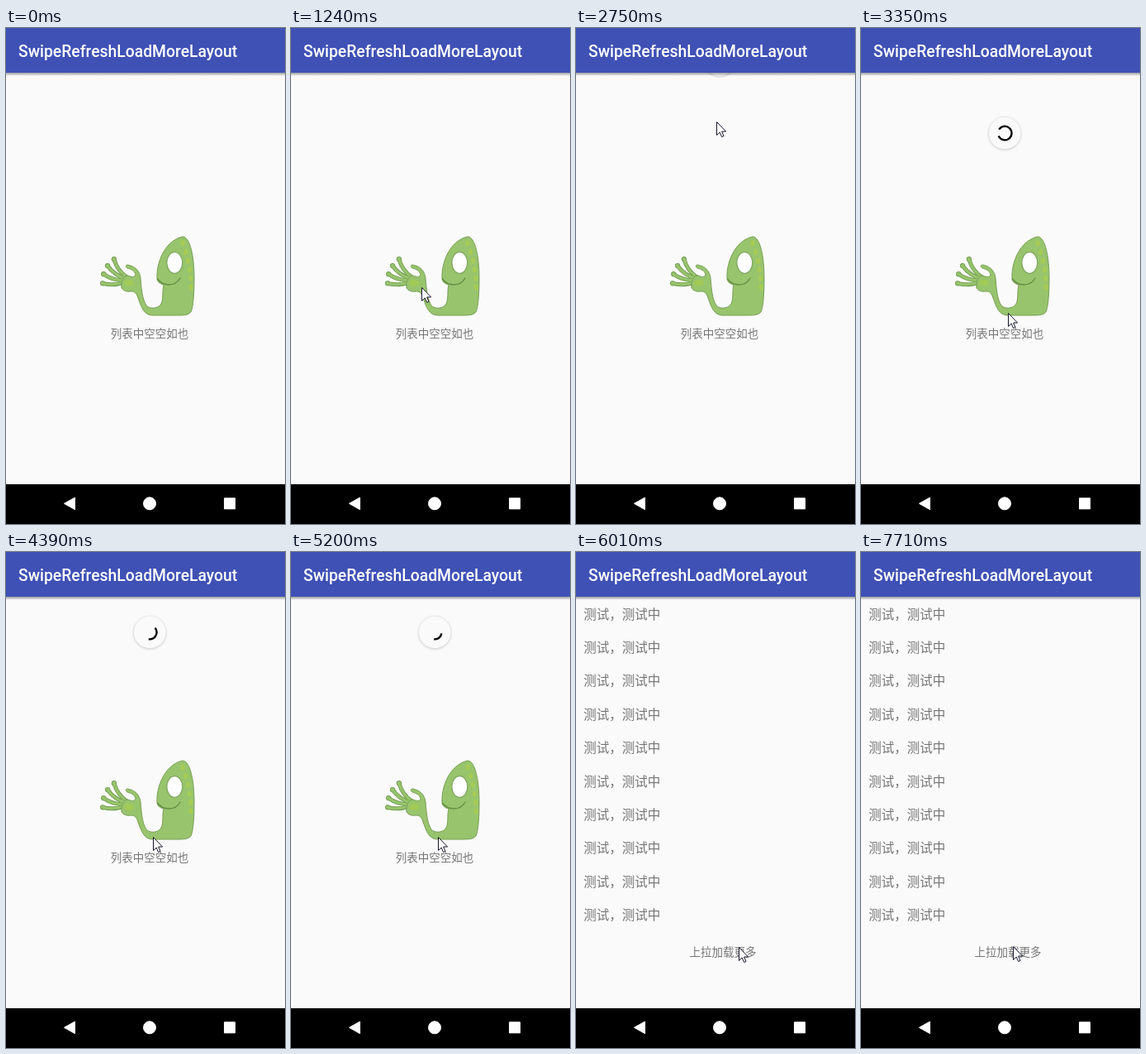
These frames come from a looping animation (338x599 px, 7990 ms). An HTML page:

```html
<!DOCTYPE html>
<html lang="zh-CN">
<head>
<meta charset="utf-8">
<style>
  html, body { margin: 0; width: 100%; height: 100%; overflow: hidden; background: #fafafa; }
  svg { display: block; width: 100vw; height: 100vh; }
  text { font-family: "Noto Sans CJK SC", "Noto Sans CJK", sans-serif; fill: #757575; }
  .title { font: 500 19.34px Roboto, sans-serif; fill: #fff; }
  .row { font-size: 15.5px; }
  .note { font-size: 13.5px; }
</style>
</head>
<body>
<svg viewBox="0 0 338 599" preserveAspectRatio="none">
  <defs>
    <linearGradient id="barShade" x2="0" y2="1">
      <stop stop-color="#000" stop-opacity=".38"/>
      <stop offset="1" stop-color="#000" stop-opacity="0"/>
    </linearGradient>
    <filter id="soft" x="-30%" y="-30%" width="160%" height="160%">
      <feGaussianBlur stdDeviation="1.5"/>
    </filter>
  </defs>
  <rect width="338" height="599" fill="#fafafa"/>

  <g id="empty">
    <g id="fingers" fill="none" stroke-linecap="round"></g>
    <path fill="#98c46d" stroke="#769f55" stroke-linejoin="round" d="
      M214 252 C223 252 228 276 228 302 C228 320 227 336 224 343
      C221 347 214 347 206 347 L178 347 C167 347 164 337 160 326
      C158 320 156 318 151 318 C146 319 142 317 140 314
      C139 306 142 299 148 299 C152 301 156 301 157 298
      C156 293 151 291 147 290 C144 288 145 285 149 286.5
      C157 288 162 294 163 302 C164 314 165 328 170 335
      C174 340 185 339 188 333 C191 327 189 318 191 310
      C186 309 183 306 183 302 C182 284 192 257 214 252 Z"/>
    <ellipse cx="149" cy="308" rx="6" ry="4" fill="#a5cc50" opacity=".75"/>
    <g id="spots" fill="#abcf4f" opacity=".8"></g>
    <path d="M183.5 303 C190 312 205 313 211 302" fill="none" stroke="#648d45" stroke-width="1.3" stroke-linecap="round"/>
    <ellipse cx="204.3" cy="283.5" rx="9.5" ry="12.8" fill="#fff" stroke="#7fa65f" stroke-width="1.3"/>
    <text class="note" x="126.8" y="374.1">列表中空空如也</text>
  </g>

  <g id="list"></g>
  <text id="more" class="note" x="137.5" y="487.6">上拉加载更多</text>

  <g id="spinner">
    <circle cy=".7" r="19.6" fill="#000" opacity=".2" filter="url(#soft)"/>
    <circle r="19.3" fill="#fafafa"/>
    <path id="arc" fill="none" stroke="#000" stroke-width="2.3" stroke-linecap="square"/>
  </g>

  <rect y="54" width="338" height="4" fill="url(#barShade)"/>
  <rect width="338" height="54" fill="#3f51b5"/>
  <text class="title" x="15" y="34.5">SwipeRefreshLoadMoreLayout</text>

  <rect y="551" width="338" height="48" fill="#000"/>
  <g fill="#fff" stroke="#fff" stroke-linejoin="round">
    <path d="M70.5 574.3 L83.5 567 V581.6 Z"/>
    <circle cx="174" cy="574.3" r="7.5"/>
    <rect x="264.5" y="567.8" width="13" height="13"/>
  </g>

  <path id="cursor" d="M.5 .5 V16.5 L4.2 13 L6.6 18.5 L9 17.5 L6.6 12 H11.6 Z"
    fill="#fff" stroke="#17172e"/>
</svg>
<script>
const LOOP = 7990, STEP = 130, PHASE = 100;
const APPEAR_AT = 620, PULL_AT = 2610, RELEASE_AT = 3400;
const FINISH_AT = 3512, SPIN_AT = 4178, CYCLE = 1332;
const LIST_AT = 5300, MORE_AT = 5440;
const REST_Y = 97, HIDDEN_Y = 34, PULLED_Y = 127;

// Pointer strokes: a bend from one point to the next
const STROKES = [
  { start: 620, end: 750, from: [251, 460], bend: [204, 394], to: [157, 328] },
  { start: 1100, end: 2200, from: [157, 328], bend: [168, 124], to: [172, 112] },
  { start: 2210, end: 2470, from: [172, 112], bend: [170, 106], to: [169, 101] },
  { start: PULL_AT, end: 3350, from: [169, 101], bend: [172, 140], to: [178, 344] },
  { start: 5600, end: 5960, from: [178, 344], bend: [174, 320], to: [198, 486] },
  { start: 6900, end: 7640, from: [198, 486], bend: [151, 361], to: [184, 476] },
];

const $ = id => document.getElementById(id);
const clamp = v => Math.min(1, Math.max(0, v));
const progress = (t, start, end) => clamp((t - start) / (end - start));
const show = (el, on) => el.setAttribute("visibility", on ? "visible" : "hidden");
const polar = (r, deg) => [r * Math.cos(deg * Math.PI / 180), r * Math.sin(deg * Math.PI / 180)];

// Cubic easing (0.4, 0, 0.2, 1)
function ease(x) {
  let lo = 0, hi = 1;
  for (let i = 0; i < 20; i++) {
    const u = (lo + hi) / 2, v = 1 - u;
    if (1.2 * u * v * v + 0.6 * u * u * v + u ** 3 < x) lo = u; else hi = u;
  }
  return lo * lo * (3 - 2 * lo);
}

function pointerAt(t) {
  const { start, end, from, bend, to } = STROKES.filter(s => s.start <= t).pop() || STROKES[0];
  const u = progress(t, start, end), v = 1 - u;
  return from.map((a, i) => v * v * a + 2 * u * v * bend[i] + u * u * to[i]);
}

// The spinner follows the drag, then eases back to rest
function spinnerY(t, pointerY) {
  if (t < RELEASE_AT) return HIDDEN_Y + (PULLED_Y - HIDDEN_Y) * clamp((pointerY - 101) / 243);
  return PULLED_Y + (REST_Y - PULLED_Y) * ease(progress(t, RELEASE_AT, RELEASE_AT + 200));
}

// Start and end of the ring in degrees, clockwise from the right
function ringAngles(t, y) {
  if (t < RELEASE_AT) {
    const start = -140 + (y - PULLED_Y) * 2;
    const pull = progress(y, HIDDEN_Y, REST_Y);
    return [start, start + 288 * progress(pull, 0.4, 1)];
  }
  if (t < SPIN_AT) {
    const p = progress(t, FINISH_AT, SPIN_AT);
    return [-140 + 412.4 * p, 148 + 128 * p];
  }
  const turns = (t - SPIN_AT) / CYCLE, p = turns % 1;
  const base = -83.5 + 324 * turns + 288 * Math.floor(turns);
  return [base + 288 * ease(clamp(p * 2 - 1)), base + 3.6 + 288 * ease(clamp(p * 2))];
}

const arcPath = ([a, b]) =>
  `M${polar(8.3, a)} A8.3 8.3 0 ${b - a > 180 ? 1 : 0} 1 ${polar(8.3, b)}`;

const repeat = (n, make) => Array.from({ length: n }, (_, i) => make(i)).join("");

function build() {
  const around = (r, deg) => polar(r, deg).map((v, i) => v + [150, 306][i]);
  const fingers = (color, width) => repeat(4, i => {
    const angle = 176 + 19.5 * i, tip = around(33, angle);
    return `<g stroke="${color}"><path stroke-width="${width}"
      d="M${tip} Q${around(20, angle - 14)} ${around(6, angle)}"/>
      <path stroke-width="${width + 1.2}" d="M${tip}h.1"/></g>`;
  });
  $("fingers").innerHTML = fingers("#769f55", 5) + fingers("#98c46d", 3);
  $("spots").innerHTML = repeat(6, i =>
    `<ellipse cx="${224 - 10 * (1 - i / 5) ** 2}" cy="${260 + 10.6 * i}" rx="2.5" ry="3.6"/>`);
  $("list").innerHTML = repeat(10, i =>
    `<text class="row" x="9.3" y="${80.6 + i * 40.4}">测试，测试中</text>`);
}

function draw(now) {
  // The screen refreshes in coarse steps
  const t = Math.floor((now - PHASE) / STEP) * STEP + PHASE;

  const [x, y] = pointerAt(t);
  show($("cursor"), t >= APPEAR_AT);
  $("cursor").setAttribute("transform", `translate(${Math.round(x)} ${Math.round(y)})`);

  show($("empty"), t < LIST_AT);
  show($("list"), t >= LIST_AT);
  show($("more"), t >= MORE_AT);

  const ringY = spinnerY(t, y);
  show($("spinner"), t >= PULL_AT && t < MORE_AT && ringY > HIDDEN_Y);
  $("spinner").setAttribute("transform", `translate(174.2 ${ringY})`);
  $("arc").setAttribute("d", arcPath(ringAngles(t, ringY)));
  $("arc").setAttribute("opacity", ringY < REST_Y ? 0.3 : 1);
}

build();
const began = performance.now();
function tick() {
  draw((performance.now() - began) % LOOP);
  requestAnimationFrame(tick);
}
tick();
</script>
</body>
</html>
```
